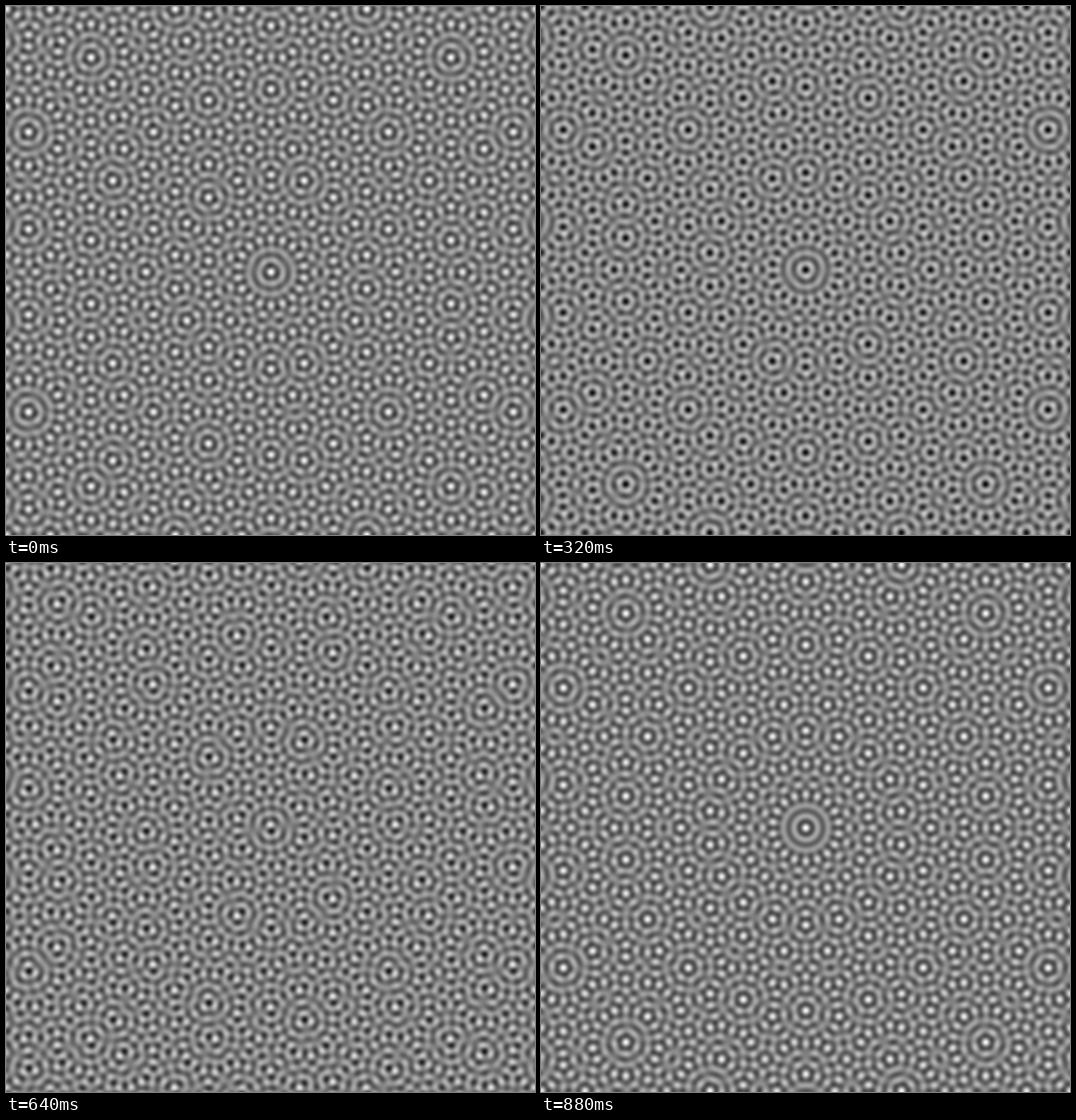
Animation of 748 by 748 pixels, one loop 0.96 s. Source, as an HTML page with a canvas:

```html
<!DOCTYPE html>
<html lang="en">
<head>
<meta charset="utf-8">
<title>Quasicrystal</title>
<style>
  html, body { margin: 0; width: 100%; height: 100%; overflow: hidden; background: #7f7f7f; }
  canvas { display: block; }
</style>
</head>
<body>
<canvas id="stage" width="748" height="748"></canvas>
<script>
const SIZE = 748, WAVES = 9, STEPS = 12, STEP_MS = 80;
const WAVE_NUMBER = 2 * Math.PI * 50 / SIZE;

const ctx = document.getElementById('stage').getContext('2d');
const image = ctx.createImageData(SIZE, SIZE);
const pixels = new Uint32Array(image.data.buffer);

// Sums of plane waves, split so that any common phase is a blend of the two.
const even = new Float32Array(SIZE * SIZE);
const odd = new Float32Array(SIZE * SIZE);

for (let w = 0; w < WAVES; w++) {
  const angle = w * Math.PI / WAVES;
  const kx = WAVE_NUMBER * Math.cos(angle);
  const ky = WAVE_NUMBER * Math.sin(angle);
  for (let y = 0, i = 0; y < SIZE; y++) {
    for (let x = 0; x < SIZE; x++, i++) {
      const p = kx * (x - SIZE / 2) + ky * (y - SIZE / 2);
      even[i] += Math.cos(p);
      odd[i] += Math.sin(p);
    }
  }
}

function draw(step) {
  const phase = 2 * Math.PI * (step + 1) / STEPS;
  const scale = 127.5 / WAVES;
  const a = scale * Math.cos(phase), b = scale * Math.sin(phase);
  for (let i = 0; i < pixels.length; i++) {
    const grey = 127.5 + a * even[i] + b * odd[i] | 0;
    pixels[i] = 0xff000000 | grey * 0x010101;
  }
  ctx.putImageData(image, 0, 0);
}

let shown = -1;
function tick() {
  const step = Math.floor(performance.now() / STEP_MS) % STEPS;
  if (step !== shown) draw(shown = step);
  requestAnimationFrame(tick);
}
tick();
</script>
</body>
</html>
```
